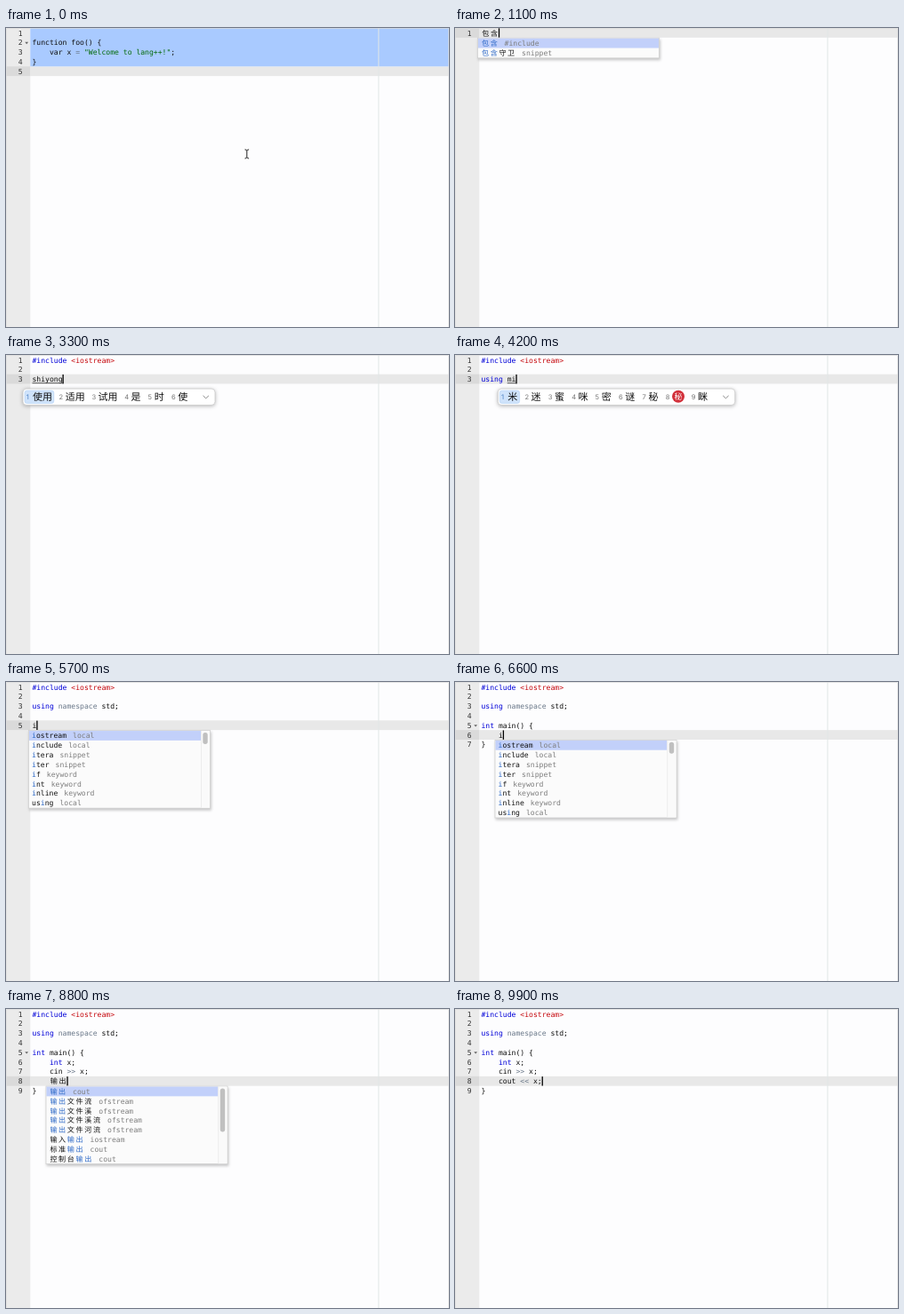
An HTML page for the animation above (10 s loop, 498 px wide and 337 px high).

```html
<!DOCTYPE html>
<html lang="en">
<head>
<meta charset="utf-8">
<title>Code editor</title>
<style>
  html, body { margin: 0; width: 498px; height: 337px; overflow: hidden; background: #fdfdfe; }
  svg { display: block; }
  text {
    font: 8.1px "DejaVu Sans Mono", "Noto Sans CJK SC", "Noto Sans CJK", monospace;
    white-space: pre;
    text-rendering: geometricPrecision;
  }
  .num { font-size: 7.6px; font-family: Inter, sans-serif; }
  .cand { font-size: 11px; font-family: "Noto Sans CJK SC", "Noto Sans CJK", sans-serif; }
  .menu { filter: drop-shadow(1.5px 2px 1.5px rgba(0, 0, 0, .22)); }
  .ime { filter: drop-shadow(0 1.5px 2px rgba(0, 0, 0, .28)); }
</style>
</head>
<body>
<svg id="stage" width="498" height="337" viewBox="0 0 498 337"></svg>
<script>
const CW = 4.87, LH = 10.83, LEFT = 29.5, LOOP = 10000;
const stage = document.getElementById('stage');

const isWide = c => c > '\u2e80';
const cols = s => [...s].reduce((n, c) => n + (isWide(c) ? 2 : 1), 0);
const esc = s => String(s).replace(/&/g, '&amp;').replace(/</g, '&lt;').replace(/>/g, '&gt;');
const rect = (x, y, w, h, fill, more = '') =>
  `<rect x="${x}" y="${y}" width="${w}" height="${h}" fill="${fill}" ${more}/>`;
const path = (d, stroke, more = '') => `<path d="${d}" fill="none" stroke="${stroke}" ${more}/>`;
const label = (x, y, s, fill, more = '') =>
  `<text x="${x}" y="${y}" fill="${fill}" ${more}>${esc(s)}</text>`;

// Text on the character grid; wide characters take two cells.
function run(x, y, s, fill) {
  let col = 0;
  const xs = [...s].map(c => {
    const at = x + col * CW + (isWide(c) ? 0.8 : 0);
    col += isWide(c) ? 2 : 1;
    return at.toFixed(2);
  });
  return label(xs.join(' '), y, s, fill);
}

const TOKEN = /("[^"]*")|(<\w+>?)|(<<|>>|=|\bnamespace\b)|(#include|\b(?:using|int)\b)|([^\s"<>=#]+|\S)/g;
const COLORS = ['#036a07', '#c5060b', '#687687', '#0000d8', '#111'];

function codeLine(s, y) {
  let out = '';
  for (const m of s.matchAll(TOKEN)) {
    const kind = m.slice(1).findIndex(g => g !== undefined);
    out += run(LEFT + cols(s.slice(0, m.index)) * CW, y, m[0], COLORS[kind]);
  }
  return out;
}

function menuBox(row, { col, word, items, pick = 0, thumb = 0 }) {
  const x = LEFT + col * CW - 4, y = (row + 1) * LH + 0.4, h = items.length * LH + 1;
  let out = rect(x, y, 204, h, '#fbfbfb', 'stroke="#cfcfcf" stroke-width=".8"');
  out += rect(x + .5, y + .5 + pick * LH, thumb ? 193 : 203, LH, '#c2d0fa');
  if (thumb) {
    out += rect(x + 193.5, y + .5, 10, h - 1, '#fafafa') + rect(x + 193.5, y + .5, .7, h - 1, '#e6e6e6');
    out += rect(x + 195.8, y + 2.4, 5.4, thumb, '#c0c0c0', 'rx="2.7"');
  }
  items.forEach((item, i) => {
    const [name, meta] = item.split('|');
    const base = y + i * LH + 8.9, hit = name.indexOf(word);
    const cut = hit < 0 ? [name, '', ''] : [name.slice(0, hit), word, name.slice(hit + word.length)];
    let tx = x + 3.6;
    cut.forEach((part, k) => {
      if (part) out += run(tx, base, part, k === 1 ? '#2d69c7' : '#111');
      tx += cols(part) * CW;
    });
    out += run(tx + 7, base, meta, '#7d7d7d');
  });
  return `<g class="menu">${out}</g>`;
}

function imeBox(row, col, list) {
  const x = LEFT + col * CW - 10.5, y = row * LH + 16.4;
  const width = c => 16 + 10.4 * [...c].length + (c === '㊙' ? 2.5 : 0);
  let tx = x + 2, out = '';
  list.forEach((c, i) => {
    if (!i) out += rect(tx, y + 2, width(c) - 4, 14.4, '#cfe3fb', 'rx="2.5" stroke="#b4d2f5" stroke-width=".6"');
    out += label(tx + 1.8, y + 12, i + 1, i ? '#777' : '#4a7fc0', 'class="num"');
    if (c === '㊙') {
      out += `<circle cx="${tx + 16}" cy="${y + 8.7}" r="7" fill="#d2303a"/>`;
      out += label(tx + 11.5, y + 12.1, '秘', '#fff', 'class="cand" style="font-size:9px"');
    } else {
      out += label(tx + 9, y + 13.2, c, '#111', 'class="cand"');
    }
    tx += width(c);
  });
  const w = tx - x + 24.4;
  out += path(`M${x + w - 13.5} ${y + 7.8}l3.2 3 3.2-3`, '#888');
  return `<g class="ime">${rect(x, y, w, 18.4, '#fff', 'rx="4" stroke="#c4c4c4" stroke-width=".7"')}${out}</g>`;
}

function draw({ lines, row, ime = '', cand, menu, selected, caret = true }) {
  const top = row * LH;
  let out = rect(0, 0, 498, 337, '#fdfdfe') + rect(0, 0, 27.3, 337, '#ebebeb');
  out += rect(27.3, top, 471, LH, '#e8e8e8') + rect(0, top, 27.3, LH, '#dadada');
  if (selected) out += rect(27.3, 0, 471, 4 * LH, '#a9caff');
  out += rect(418.4, 0, 1, 337, '#e2e7e7');
  out += path('M.5 337V.5H497.5V337', '#dcdcdc', 'stroke-opacity=".7"');

  lines.forEach((s, i) => {
    const y = i * LH + 8.5;
    out += label(16.3, y, i + 1, '#333', 'text-anchor="middle"');
    if (s.endsWith('{')) out += `<path d="M21.3 ${y - 3.6}h3.8l-1.9 2.4z" fill="#666"/>`;
    out += codeLine(s, y);
  });

  const start = cols(lines[row]), x = LEFT + start * CW;
  if (ime) {
    out += run(x, top + 8.5, ime, '#111');
    out += rect(x, top + 9.7, ime.length * CW, .8, '#333');
  }
  if (selected) {
    out += path('M268.5 137q2 0 2.3 1.2q.3-1.2 2.3-1.2M270.8 138v8M268.5 147q2 0 2.3-1.2q.3 1.2 2.3 1.2', '#222');
  } else if (caret) {
    out += rect(x + ime.length * CW - .1, top + .3, 1.3, LH - .4, '#000');
  }
  if (menu) out += menuBox(row, menu);
  if (cand) out += imeBox(row, start, cand);
  stage.innerHTML = out;
}

// Timeline: each call records the whole editor state from time t on.
const steps = [];
let lines = ['', 'function foo() {', '    var x = "Welcome to lang++!";', '}', ''], row = 4;
const push = (t, extra) => steps.push({ t, lines: [...lines], row, ...extra });
const type = (t, text, extra) => { lines[row] = text; push(t, extra); };
const enter = (t, indent = '', ...after) => { lines.splice(++row, 0, indent, ...after); push(t); };
const compose = (t, ime, cand) => push(t, { ime, cand: cand.split(' ') });
const suggest = (t, text, word, items, extra) =>
  type(t, text, { menu: { col: cols(text) - cols(word), word, items, ...extra }, caret: extra?.caret });

const SHU = '是 时 使 事 十 说 上 式 市', SHU2 = '书 数 输 树 属 熟 术 叔 束';
const IN = '输入 输 书 数 树 属', OUT = '输出 输 书 数 树 属';
const I_ITEMS = ['iostream|local', 'include|local', 'itera|snippet', 'iter|snippet',
  'if|keyword', 'int|keyword', 'inline|keyword', 'using|local'];
const IN_ITEMS = ['输入输出|iostream', '输入|cin', '输入文件流|ifstream', '输入文件溪|ifstream',
  '输入文件溪流|ifstream', '输入文件河流|ifstream', '标准输入输出|cin', '文件输入输出|fstream'];
const OUT_ITEMS = ['输出|cout', '输出文件流|ofstream', '输出文件溪|ofstream', '输出文件溪流|ofstream',
  '输出文件河流|ofstream', '输入输出|iostream', '标准输出|cout', '控制台输出|cout'];
const STD_ITEMS = ['标准|std', '标准输入|cin', '标准输出|cout', '标准错误|cerr',
  '标准日志|clog', '标准输入输出|cin', '标准库|std', '标准异常|exception'];
const X_ITEMS = ['x|local', 'xor|keyword', 'xor_eq|keyword', 'max|function',
  'extern|keyword', 'explicit|keyword', 'export|keyword', 'exit|function'];

push(0, { selected: true });
lines = ['']; row = 0;
push(100);
compose(300, 'b', '不 把 被 吧 本 比 别 部 并');
compose(500, 'ba', '把 吧 八 爸 巴 拔 罢 霸 扒');
compose(600, 'bao', '包 报 保 抱 宝 爆 饱 暴 薄');
compose(700, 'baoh', '包含 保护 饱和 包 报 保');
compose(900, 'baohan', '包含 包涵 饱含 包 报 保');
type(1000, '包含');
suggest(1100, '包含', '包含', ['包含|#include', '包含守卫|snippet']);
type(1300, '#include');
type(1400, '#include ');
type(1500, '#include <');
compose(1600, 's', SHU);
compose(1700, 'shu', SHU2);
compose(1800, 'shuru', IN);
suggest(1900, '#include <输入', '输入', IN_ITEMS.slice(0, 6));
type(2200, '#include <iostream');
type(2400, '#include <iostream>');

enter(2500);
enter(2600);
compose(2800, 's', SHU);
compose(3000, 'shi', '是 时 使 事 十 式 市 师 实');
compose(3200, 'shiy', '使用 适用 试用 是 时 使');
compose(3300, 'shiyong', '使用 适用 试用 是 时 使');
type(3400, '使用');
suggest(3500, '使用', '使用', ['使用|using', '使用空间|snippet']);
type(3900, 'using');
type(4000, 'using ');
compose(4100, 'm', '吗 没 们 每 买 名 明 门 慢');
compose(4200, 'mi', '米 迷 蜜 咪 密 谜 秘 ㊙ 眯');
compose(4300, 'ming', '名 明 命 鸣 铭 冥 茗 溟 螟');
suggest(4400, 'using 命名', '命名', ['命名空间|namespace', '命名|name', '重命名|rename',
  '命名类型|typename', '命名符|typeid', '未命名|snippet']);
type(4600, 'using namespace');
type(4700, 'using namespace ');
compose(4800, 'biao', '表 标 彪 飙 镖 膘 裱 婊 飚');
compose(4900, 'biaozhun', '标准 标注 表尊 标尊 表准 标谆 表谆 彪准 标');
suggest(5000, 'using namespace 标准', '标准', STD_ITEMS, { thumb: 45 });
type(5100, 'using namespace std');
type(5200, 'using namespace std;');

enter(5400);
enter(5500);
suggest(5600, 'i', 'i', I_ITEMS, { thumb: 13 });
suggest(5800, 'int', 'int', ['int|keyword', 'int8_t|type', 'int16_t|type', 'int32_t|type']);
type(5900, 'int ');
compose(6000, 'z', '在 这 着 中 做 最 主 只 再');
compose(6100, 'zhu', '主 住 注 猪 祝 竹 朱 珠 煮');
suggest(6200, 'int 主', '主', ['主函数|main', '主|main']);
type(6300, 'int main()');
type(6400, 'int main() {');
enter(6500, '    ', '}');
suggest(6600, '    i', 'i', I_ITEMS, { thumb: 13 });
type(6700, '    int x;');
enter(6800, '    ');

compose(7000, 's', SHU);
compose(7100, 'shu', SHU2);
compose(7200, 'shuru', IN);
suggest(7300, '    输入', '输入', IN_ITEMS, { thumb: 45 });
suggest(7500, '    输入', '输入', IN_ITEMS, { thumb: 45, pick: 1, caret: false });
type(7600, '    cin');
type(7700, '    cin ');
type(7800, '    cin >>');
type(7900, '    cin >> ');
suggest(8000, '    cin >> x', 'x', X_ITEMS, { thumb: 45 });
type(8100, '    cin >> x;');
enter(8300, '    ');

compose(8600, 'shu', SHU2);
compose(8700, 'shuchu', OUT);
suggest(8800, '    输出', '输出', OUT_ITEMS, { thumb: 49 });
type(9100, '    cout');
type(9200, '    cout ');
type(9400, '    cout <<');
type(9500, '    cout << ');
suggest(9600, '    cout << x', 'x', X_ITEMS, { thumb: 45 });
type(9800, '    cout << x;');

const began = performance.now();
let shown;
function tick() {
  const t = (performance.now() - began) % LOOP;
  const step = steps.findLast(s => s.t <= t) || steps[0];
  if (step !== shown) draw(shown = step);
  requestAnimationFrame(tick);
}
tick();
</script>
</body>
</html>
```
